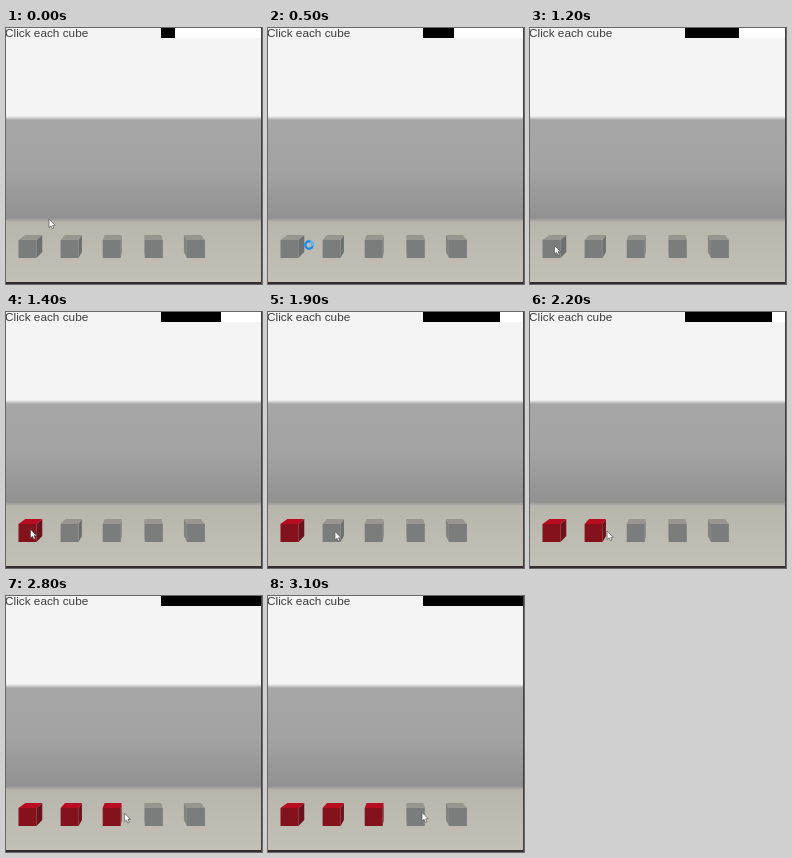
An HTML page with a canvas that plays this animation: 256 by 256 pixels, repeating every 4000 ms.

```html
<!DOCTYPE html>
<html lang="en">
<head>
<meta charset="utf-8">
<style>
  html, body { margin: 0; width: 100%; height: 100%; overflow: hidden; background: #f4f4f4; }
  canvas { display: block; width: 100vw; height: 100vh; }
</style>
</head>
<body>
<canvas id="stage" width="256" height="256"></canvas>
<script>
const ctx = document.getElementById('stage').getContext('2d');
const LOOP = 4000, STEP = 100, LAST_STEP = 3100, MOVE = 300;

const cubeCount = 5, cubeSize = 18, cubeTop = 212;
const clickTimes = [1300, 2100, 2500];
const vanishing = { x: 130, y: 126 }, shrink = 0.058;
const gray = { front: '#7b7d7c', top: '#98968f', left: '#82837f', right: '#6e706f' };
const red = { front: '#84121d', top: '#b80d20', left: '#84121d', right: '#6c101a' };

// The pointer glides into each stop and rests there.
const stops = [
  { arrive: 0, x: 43, y: 191 },
  { arrive: 300, x: 39, y: 213 },
  { arrive: 900, x: 65, y: 214 },
  { arrive: 1200, x: 24.5, y: 217.5 },
  { arrive: 1700, x: 67, y: 219.5 },
  { arrive: 2400, x: 106, y: 217.5 },
  { arrive: 3000, x: 154, y: 216.5 }
];
const busy = { from: 300, to: 700 };

const mix = (a, b, u) => a + (b - a) * u;
const smooth = u => u * u * (3 - 2 * u);

function rect(x, y, w, h, color) {
  ctx.fillStyle = color;
  ctx.fillRect(x, y, w, h);
}

function polygon(points, color) {
  ctx.beginPath();
  points.forEach(([x, y]) => ctx.lineTo(x, y));
  ctx.closePath();
  ctx.fillStyle = color;
  ctx.fill();
}

function band(top, bottom, ...colors) {
  const fill = ctx.createLinearGradient(0, top, 0, bottom);
  colors.forEach((color, i) => fill.addColorStop(i / (colors.length - 1), color));
  rect(0, top, 256, bottom - top, fill);
}

function drawRoom() {
  rect(0, 0, 256, 256, '#f4f4f4');
  band(88, 92, '#f4f4f4', '#a6a6a6');
  band(92, 141, '#a6a6a6', '#a3a3a3');
  band(141, 190, '#a3a3a3', '#919191');
  band(190, 194, '#919191', '#b8b5ad');
  band(194, 254, '#b8b5ad', '#c3c0b7');
  rect(0, 254, 256, 2, '#352c32');
  ctx.font = '11.8px "Liberation Sans", Arial, sans-serif';
  ctx.fillStyle = '#3c3c3c';
  ctx.fillText('Click each cube', -1, 9);
}

function drawBar(t) {
  rect(155, 0, 101, 10, '#fff');
  rect(155, 0, Math.min(101, Math.round(14 + t * 0.0331)), 10, '#000');
  rect(255, 0, 1, 256, '#453e43');
}

function drawCube(index, t) {
  const tone = t >= clickTimes[index] ? red : gray;
  const left = 12.5 + index * 42.1, right = left + cubeSize;
  const bottom = cubeTop + cubeSize;
  const back = ([x, y]) => [mix(x, vanishing.x, shrink), mix(y, vanishing.y, shrink)];
  const face = (a, b, color) => polygon([a, back(a), back(b), b], color);
  if (left > vanishing.x) face([left, cubeTop], [left, bottom], tone.left);
  if (right < vanishing.x) face([right, cubeTop], [right, bottom], tone.right);
  face([left, cubeTop], [right, cubeTop], tone.top);
  rect(left, cubeTop, cubeSize, cubeSize, tone.front);
}

function pointerAt(t) {
  const next = stops.findIndex(stop => stop.arrive > t);
  if (next < 0) return stops[stops.length - 1];
  const from = stops[next - 1], to = stops[next];
  const u = smooth(Math.max(0, 1 - (to.arrive - t) / MOVE));
  return { x: mix(from.x, to.x, u), y: mix(from.y, to.y, u) };
}

function drawSpinner(x, y, t) {
  const ring = (color, start, sweep) => {
    ctx.strokeStyle = color;
    ctx.beginPath();
    ctx.arc(x, y, 3.7, start, start + sweep);
    ctx.stroke();
  };
  ctx.lineWidth = 2.2;
  ring('#1688ee', 0, Math.PI * 2);
  ring('#62b8ff', t / 100, 1.5);
}

function drawArrow(x, y) {
  const outline = [[0, 0], [0, 8.5], [2, 6.8], [3.4, 9.8], [4.8, 9.1], [3.5, 6.3], [6.2, 6.2]];
  polygon(outline.map(([dx, dy]) => [x + dx, y + dy]), '#fff');
  ctx.lineWidth = 0.6;
  ctx.strokeStyle = '#444';
  ctx.stroke();
}

function draw(now) {
  const t = Math.min(Math.floor(now % LOOP / STEP) * STEP, LAST_STEP);
  drawRoom();
  drawBar(t);
  for (let i = 0; i < cubeCount; i++) drawCube(i, t);
  const { x, y } = pointerAt(t);
  if (t >= busy.from && t < busy.to) drawSpinner(x + 2, y + 4, t);
  else drawArrow(x, y);
}

let start;
function frame(now) {
  start ??= now;
  draw(now - start);
  requestAnimationFrame(frame);
}
draw(0);
requestAnimationFrame(frame);
</script>
</body>
</html>
```
